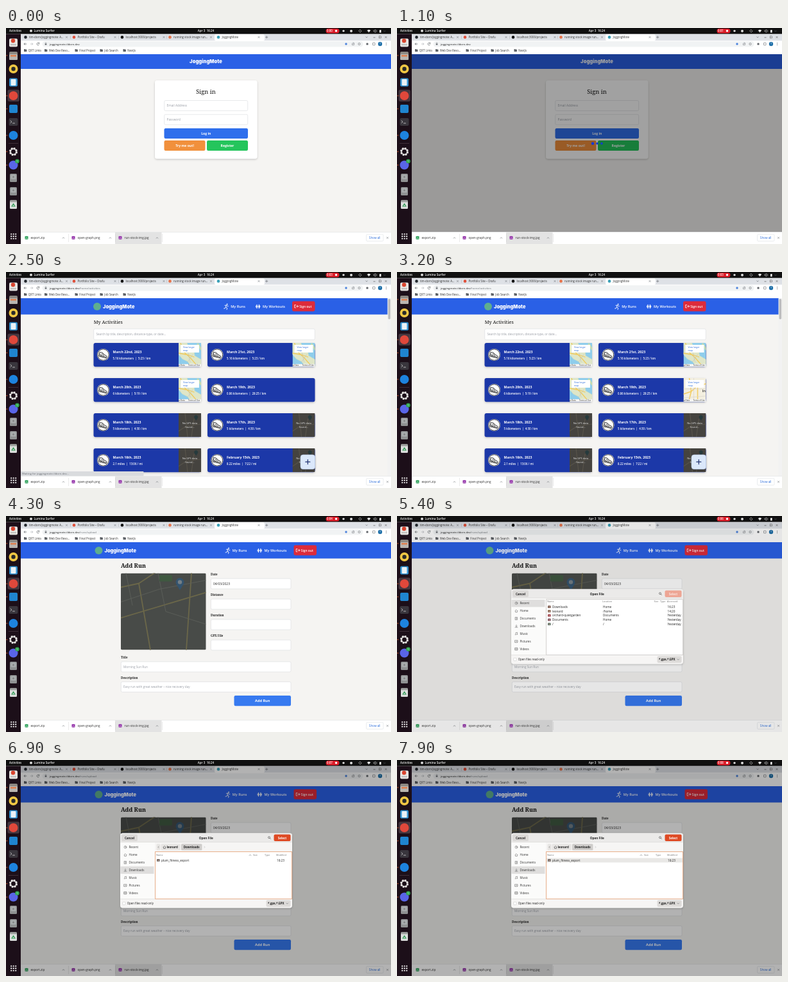
An HTML page for the animation above (8 s loop, 600 by 338 pixels).

```html
<!DOCTYPE html>
<html lang="en">
<head>
<meta charset="utf-8">
<title>Run log demo</title>
<style>
html, body { margin: 0; width: 100%; height: 100%; overflow: hidden; background: #fff; }
svg { display: block; }
#stage { width: 100vw; height: 100vh; }
text { font-family: "Open Sans", "Noto Sans", sans-serif; white-space: pre; }
.serif { font-family: "Noto Serif", serif; }
.brand { font-family: Inter, sans-serif; font-weight: 900; }
</style>
</head>
<body>
<svg id="stage" viewBox="0 0 600 338"></svg>
<script>
const LOOP = 8000;
const BRAND = 'JoggingMote', HOST = 'joggingmote.tldorn.dev';
const BLUE = '#2a60e6', GREY = '#5f6368';

const rect = (x, y, w, h, fill, r = 0, more = '') =>
  `<rect x="${x}" y="${y}" width="${w}" height="${h}" rx="${r}" fill="${fill}" ${more}/>`;
const disc = (x, y, r, fill, more = '') => `<circle cx="${x}" cy="${y}" r="${r}" fill="${fill}" ${more}/>`;
const line = (d, stroke, w = .7, fill = 'none') =>
  `<path d="${d}" stroke="${stroke}" stroke-width="${w}" fill="${fill}" stroke-linecap="round" stroke-linejoin="round"/>`;
const text = (x, y, size, str, fill = '#222', more = '') =>
  `<text x="${x}" y="${y}" font-size="${size}" fill="${fill}" ${more}>${str}</text>`;
const MID = 'text-anchor="middle" ', BOLD = 'font-weight="700" ', SEMI = 'font-weight="600" ';
const shift = (x, y, body) => `<g transform="translate(${x} ${y})">${body}</g>`;
const during = (from, to, body) => `<g data-from="${from}" data-to="${to}">${body}</g>`;
const cross = (x, y, c = GREY) => line(`M${x - 1.2} ${y - 1.2}l2.4 2.4m0-2.4l-2.4 2.4`, c, .5);
const caret = (x, y, up = 1) => line(`M${x - 1.3} ${y + .6 * up}l1.3 ${-1.3 * up} 1.3 ${1.3 * up}`, GREY, .6);
const field = (x, y, w, h) => rect(x, y, w, h, '#fff', 2, 'stroke="#d9dade" stroke-width=".6"');
const button = (x, y, w, h, fill, label, size = 5.1) =>
  rect(x, y, w, h, fill, 2.2) + text(x + w / 2, y + h / 2 + 1.9, size, label, '#fff', MID + BOLD);

function topBar() {
  return rect(0, 0, 600, 9.3, '#101010') + text(5, 6.3, 4.4, 'Activities', '#eee', SEMI) +
    disc(39, 4.6, 2, '#ddd') + text(43.5, 6.3, 4.7, 'Lumina Surfer', '#eee', SEMI) +
    text(311.5, 6.3, 4.5, 'Apr 3  16:24', '#eee', MID + SEMI) +
    rect(498.5, 1, 21, 7.3, '#dc1c28', 3.6) + text(500, 6.2, 4.4, '0:00', '#fff', 'id="timer" ' + SEMI) +
    rect(512.8, 2.8, 3.4, 3.4, '#fff', 1.7) + disc(526, 4.6, 1.7, '#ddd') + disc(538, 4.7, 2, '#ddd') +
    line('M552 2.8l2 2-2 2-2-2z', '#ddd') + line('M563 3.8q2.5-2 5 0l-2.5 3z', '#eee', .3, '#eee') +
    line('M573 3.8v1.8h1l1.6 1.4V2.4L574 3.8zM577.3 3.2q1 1.5 0 3', '#eee', .5) +
    rect(582, 3, 2.6, 4.3, '#eee', .5) + caret(590, 4.8, -1);
}

function dock() {
  const app = (y, fill, round) => round ? disc(11.5, y, 7, fill) : rect(5, y - 6.5, 13, 13, fill, 2);
  const dot = y => disc(1.4, y, .8, '#e5602c');
  let s = rect(0, 9.3, 23, 329, '#1c0f19') + rect(2.5, 96.5, 18.5, 18.5, '#46373f', 3);
  s += app(23, '#e6e4e1') + disc(11, 20, 3.2, '#d9452f') + rect(7, 25.5, 9, 1.2, '#aaa');
  s += rect(5, 37, 13, 13, '#8d8983', 2) + rect(5, 41, 13, 9, '#b9b5b0', 1.5) + rect(7, 42.5, 9, 2, '#e8743b');
  s += app(64, '#f0c744', 1) + disc(11.5, 64, 3.2, '#2a2a2a') + app(85, '#2f8fcd');
  s += rect(7.5, 80, 8, 10, '#eaf2f7', 1) + app(106, '#e0483b', 1) + app(126.5, '#1f84cf');
  s += rect(4.5, 141, 14, 12, '#39363d', 2) + line('M7 145l2 1.8-2 1.8M10.5 149h3', '#eee');
  s += app(168, '#1d83df', 1) + rect(4, 180, 15, .6, '#57464f');
  s += disc(11.5, 193.5, 5.3, 'none', 'stroke="#ecebe9" stroke-width="2.4" stroke-dasharray="2.8 1.3"') +
    disc(11.5, 193.5, 4.3, 'none', 'stroke="#ecebe9" stroke-width="1.6"');
  s += app(214.5, '#5965e8', 1) + disc(17.5, 208.5, 3.3, '#32a852') + text(17.5, 210, 4, '1', '#fff', MID);
  for (const y of [234.5, 255.5]) s += rect(6, y - 6.5, 11, 13, '#8f9192', 1.5) + rect(7.5, y - 5, 8, 7, '#aaaeaf', 1) + disc(11.5, y - 1.5, 1.6, '#858788');
  s += rect(6, 269.5, 11, 13.5, '#dcdedd', 1.5) + rect(6, 269.5, 11, 3, '#9da09e', 1) + line('M9 279l2.5-4 2.5 4z', '#2f9b55', 1.2);
  for (let i = 0; i < 9; i++) s += rect(7.2 + i % 3 * 3.5, 321.5 + (i / 3 | 0) * 3.5, 2, 2, '#f2f2f2', .5);
  return s + [43, 106, 126.5, 168, 193.5, 214.5].map(dot).join('');
}

function browser() {
  const tabs = [
    [30.5, 'tim-dorn/joggingmote: A…', 94.5, '#24292f'], [106, 'Portfolio Site – Drafu', 170, '#e0503a'],
    [181, 'localhost:3000/projects', 246, '#111'], [255.5, 'running stock image run…', 319.5, '#e8734a'],
    [331, BRAND, 394, '#3aa0b8']];
  let s = rect(23, 9.3, 577, 329, '#fff') + rect(23, 9.3, 577, 10.4, '#dee1e6') + rect(325, 10, 78, 10, '#fff', 2.5);
  for (const [x, name, end, color] of tabs)
    s += disc(x, 14.4, 2.3, color) + text(x + 5.4, 16, 4.4, name, '#333') + cross(end, 14.4);
  for (const x of [100, 175, 250]) s += rect(x, 12, .4, 5, '#a5a8ad');
  s += line('M404.5 14.4h3.4m-1.7-1.7v3.4', GREY, .6) + caret(562, 14.4, -1) + rect(572.5, 14.6, 3, .6, '#444');
  s += rect(581.5, 12.8, 3, 3, 'none', 0, 'stroke="#444" stroke-width=".5"') + cross(592, 14.4, '#444');
  s += line('M31.8 25h-3.6m1.5-1.6l-1.6 1.6 1.6 1.6', GREY) + line('M38.2 25h3.6m-1.5-1.6l1.6 1.6-1.6 1.6', '#b5b8bc');
  s += line('M51.6 24a1.9 1.9 0 1 0 0 2m.2-3v1.2h-1.2', GREY) + rect(56.5, 20.8, 500, 8.6, '#f1f3f4', 4.3);
  s += rect(60.7, 24.4, 2.6, 2.2, GREY, .3) + line('M61.2 24.4v-1a.8.8 0 0 1 1.6 0v1', GREY, .4);
  const url = (from, to, path) => during(from, to, text(68, 26.6, 4.3, `${HOST}<tspan fill="#70757a">${path}</tspan>`));
  s += url(0, 1500, '') + url(1500, 3800, '/home/activities') + url(3800, LOOP, '/runs/upload');
  s += disc(530, 25, 1.7, '#4b82dc') + line('M539.4 26.2v-2h3v2zM541 22.8l1.7 1', GREY, .5) + disc(550.5, 25, 1.6, 'none', `stroke="${GREY}" stroke-width=".6"`);
  s += rect(561.5, 23.5, 3, 3, GREY, .6) + rect(571.5, 23.2, 3.6, 3.6, 'none', .4, `stroke="${GREY}" stroke-width=".6"`);
  s += disc(583, 25, 3.2, '#1d6fa8') + text(583, 26.4, 3.8, 'T', '#fff', MID);
  for (const y of [23.3, 25, 26.7]) s += disc(592.5, y, .5, GREY);
  for (const [x, name] of [[28, 'QRT Links'], [60, 'Web Dev Reso…'], [107.5, 'Final Project'], [146.5, 'Job Search'], [182.5, 'NextJs']])
    s += rect(x, 33.5, 4.4, 3.4, GREY, .5) + rect(x, 33, 2, 1.2, GREY, .4) + text(x + 6.8, 37, 4.4, name, '#333');
  return s;
}

function downloads() {
  let s = rect(23, 319, 577, 19, '#fff') + rect(23, 319, 577, .5, '#d4d6d9') + rect(170, 319.5, 72.5, 18.5, '#e3e3e3');
  for (const [x, name, end, color] of [[29.5, 'export.zip', 89.5, '#2da15a'], [102.5, 'open-graph.png', 162.5, '#922fa8'], [175.5, 'run-stock-img.jpg', 235.5, '#922fa8']])
    s += rect(x, 325.8, 5, 5, color, .8) + line(`M${x + 1} 329.8l1.5-2 1.5 2`, '#fff', .5) +
      text(x + 9, 330, 4.7, name, '#333') + caret(end, 328.4) + rect(end + 7.5, 322, .4, 13, '#ccc');
  return s + rect(561.5, 323, 26.5, 10.5, '#fff', 1.5, 'stroke="#d5d8dc" stroke-width=".5"') +
    text(574.7, 330, 4.6, 'Show all', '#2b6cdb', MID) + cross(594.5, 328.3);
}

function login() {
  return rect(23, 41, 577, 278, '#f5f4f2') + rect(23, 41, 577, 23, BLUE) +
    text(311.5, 55.4, 7.6, BRAND, '#fff', MID + 'class="brand"') +
    rect(232, 82, 159.5, 122.5, '#fff', 3.5, 'filter="url(#soft)"') +
    text(311.5, 103.3, 9.3, 'Sign in', '#111', MID + 'class="serif" font-weight="500"') +
    field(246.7, 113.5, 130, 16) + text(250.5, 123.2, 4.8, 'Email Address', '#9a9ea6') +
    field(246.7, 135.3, 130, 16) + text(250.5, 145, 4.8, 'Password', '#9a9ea6') +
    button(246.5, 157, 130.5, 16, '#2f6fec', 'Log in') +
    button(246.5, 176, 64, 16, '#f1903c', 'Try me out!') + button(313, 176, 64, 16, '#24c55c', 'Register');
}

const nav = dx => rect(23, 41, 577, 25.5, BLUE) + shift(dx, 0,
  disc(142, 54, 6, '#5fae8e') + text(151, 56.6, 7.4, BRAND, '#fff', 'class="brand"') +
  disc(344.6, 50.6, 1, '#fff') + line('M341 52.3l2.4-.3-1 3 2.2 1.2-.5 2.6M342.2 55.4l-1 1.6h-1.6M343.8 52l1 1.4h1.5', '#fff', .9) +
  text(350.3, 55.9, 5.5, 'My Runs', '#fff', SEMI) +
  line('M389.7 53v2M395.7 53v2', '#fff', 1) + line('M391 51.5v5M394.4 51.5v5', '#fff', 1.3) + line('M391 54h4', '#fff', 1) +
  text(400, 55.9, 5.5, 'My Workouts', '#fff', SEMI) + rect(446, 45.8, 35.5, 15.7, '#dc2b3b', 2.4) +
  line('M451.5 51.5h-1.8v4.4h1.8M452 53.7h3.4m-1.4-1.5l1.5 1.5-1.5 1.5', '#fff', .8) + text(457.2, 55.5, 4.9, 'Sign out', '#fff', SEMI));

const thumb = (x, y, body) => `<svg x="${x}" y="${y}" width="35" height="37">${body}</svg>`;

function cityMap(x, y, inland) {
  const scene = inland
    ? rect(0, 0, 35, 37, '#f3efe0') + line('M0 25l12-4 10-9 13-3M8 37l4-16-3-21M22 37V12', '#f3cd62', 1.5) + line('M0 17h35M16 0v37M0 31l35-3', '#d8d5cb', .7) + text(29, 22, 6, 'In', '#333', SEMI)
    : rect(0, 0, 35, 37, '#8fcdeb') + line('M0 0h13l3 8 8 6 1 6 10 6v11H20l-6-8-8-4-6-7z', '#d5e3bd', .6, '#dfe6c8') +
      line('M3 0l5 14 10 9 12 14M0 16l16 3 8 3', '#f0cb5f', 1.3) + line('M14 12l4 18M22 18l-8 12', '#c7c4b8', .6) + line('M30 2l5 8', '#c4dcb0', 3);
  return thumb(x, y, scene + rect(3, 3, 29, 12, '#fff', .5) + text(7, 8, 3.5, 'View larger', '#2b6cdb') + text(7, 12.7, 3.5, 'map', '#2b6cdb') +
    rect(0, 33, 35, 4, '#f4f4f2') + text(-4, 36.2, 3, 'Map Data', '#333') + text(15, 36.2, 3, 'Terms of Use', '#333'));
}

const noGps = (x, y) => thumb(x, y, rect(0, 0, 35, 37, '#45433f') + line('M0 28l12-8 23-3M10 0l4 37M24 9l-4 28', '#57534a', 1.2) +
  line('M27.2 11l-2.6-4a2.8 2.8 0 1 1 5.2 0z', '#263a3d', .5, '#263a3d') +
  text(17.5, 17, 4, 'No GPS data', '#e8e8e8', MID) + text(17.5, 23, 4, 'found...', '#e8e8e8', MID));

const shoe = disc(0, 0, 9.6, '#fff') + disc(0, 0, 8.7, 'none', 'stroke="#111" stroke-width=".8"') +
  '<g transform="rotate(14)">' + line('M-6.2 1.5V-3q1.6 1.4 3.4-.2l4.6 2.8 3.4.8q1.5.6 1 2.2H-6z', '#111', .8) +
  line('M-6 4h12.2M-1.6-1.6l-1.4 1.6M0-.7l-1.4 1.6M1.6.2L.2 1.8M-6 .2l4 2', '#111', .7) + '</g>';

function activities() {
  const runs = [
    ['March 22nd, 2023', '5.16 kilometers  |  5:23 / km', 2300], ['March 21st, 2023', '5.16 kilometers  |  5:23 / km', 2400],
    ['March 20th, 2023', '6 kilometers  |  5:19 / km', 2500], ['March 19th, 2023', '0.86 kilometers  |  28:25 / km', 2700],
    ['March 18th, 2023', '5 kilometers  |  4:30 / km'], ['March 17th, 2023', '5 kilometers  |  4:30 / km'],
    ['March 16th, 2023', '2.1 miles  |  13:06 / mi'], ['February 15th, 2023', '8.22 miles  |  7:22 / mi']];
  let s = rect(23, 41, 577, 278, '#f5f4f2') + nav(0) + text(136.7, 81.2, 7.3, 'My Activities', '#111', 'class="serif" font-weight="500"') +
    field(136.7, 89, 344.6, 17) + text(140.5, 99.2, 4.6, 'Search by title, description, distance-type, or date...', '#9a9ea6');
  runs.forEach(([day, stats, loaded], i) => {
    const x = 136.5 + i % 2 * 177.5, y = 111 + (i >> 1) * 55;
    s += rect(x, y, 167.5, 37.3, '#1e38a8', 3, 'filter="url(#soft)"') + shift(x + 15, y + 18.5, shoe) +
      text(x + 30, y + 15.5, 5.2, day, '#fff', BOLD) + text(x + 30, y + 25.8, 4.4, stats, '#fff', SEMI) +
      (loaded ? during(loaded, LOOP, cityMap(x + 132.5, y, i === 3)) : noGps(x + 132.5, y));
  });
  return s + rect(459, 286, 22.7, 22.5, '#dbe8fb', 4, 'stroke="#b9cdee" stroke-width=".6" filter="url(#soft)"') +
    line('M466.8 297.2h7m-3.5-3.5v7', '#1e2f6e', 1.2) +
    rect(594.5, 41, 5.5, 278, '#f2f2f2') + rect(595.5, 42, 3.6, 32, '#bdbdbd', 1.8) +
    during(1500, 2900, rect(23, 312, 191.5, 7, '#d9dbde', 1) + text(25, 317, 4.3, `Waiting for ${HOST}...`, '#6b6f74'));
}

function upload() {
  const label = (x, y, str) => text(x, y, 4.5, str, '#222', 'class="serif" ' + SEMI);
  let s = rect(23, 41, 577, 278, '#f5f4f2') + nav(2.5) + text(179, 80.6, 9, 'Add Run', '#111', 'class="serif" ' + BOLD);
  s += '<svg x="179" y="89.5" width="132.5" height="120">' + rect(0, 0, 133, 120, '#484b48', 2) +
    line('M0 22l28-6 30-20M28 16l18 104M0 70l133-40M110 0l-8 120', '#6b6749', 1.8) +
    line('M8 0l10 50M58 0l12 60 63 20M0 45l60-20 73-14', '#5d605b', .9) + rect(60, 3, 20, 10, '#3f5840', 1) +
    disc(92, 14, 6.5, '#34546f') + disc(92, 14, 3.2, '#747f86') + line('M87 18l5 8 5-8z', '#34546f', .5, '#34546f') + '</svg>';
  ['Date', 'Distance', 'Duration', 'GPX File'].forEach((name, i) => {
    s += label(319, 93 + 32 * i, name) + field(319.3, 98 + 32 * i, 124.7, 16);
  });
  return s + text(323, 107.8, 4.9, '04/03/2023', '#222') +
    label(179, 222.5, 'Title') + field(179.3, 228, 264.7, 16) + text(183, 237.8, 4.7, 'Morning Sun Run', '#9a9ea6') +
    label(179, 254.6, 'Description') + field(179.3, 259.5, 264.7, 16) + text(183, 269.4, 4.7, 'Easy run with great weather – nice recovery day', '#9a9ea6') +
    button(355.5, 281, 88.5, 16.2, '#377af0', 'Add Run', 5.6);
}

function dialog() {
  const OPEN = 6900;
  const places = [
    ['Recent', 'M2-.2a2 2 0 1 1-4 0a2 2 0 1 1 4 0M0-1.4V0h1'], ['Home', 'M-2 0l2-2 2 2M-1.4 0v2h2.8V0'],
    ['Documents', 'M-1.5-2h3v4h-3zM-.6-.6h1.2M-.6.6h1.2'], ['Downloads', 'M0-2v3M-1.3-.2L0 1.1 1.3-.2M-2 2h4'],
    ['Music', 'M-1 1.4v-3l2.5-.4v3M-1.8 1.6h.8M.7 1.2h.8'], ['Pictures', 'M-2-1.6h4v3.4h-4zM-1.5 1.3L0-.3l1.6 1.5'],
    ['Videos', 'M-2-1.6h4v3.4h-4zM-1-1.6v3.4M1-1.6v3.4']];
  const rowY = i => 136.6 + i * 11.9;
  const folder = (y, c) => rect(235, y - 2, 4.6, 3.8, c, .6) + rect(236.3, y - .6, 2, 1.4, '#c9a99a', .3);
  const head = (y, cols) => cols.map(([x, s]) => text(x, y, 3.8, s, '#777')).join('');
  const picked = i => rect(178.5, rowY(i) - 5.8, 52, 11.6, '#dfdedd');
  const border = (y, c) => rect(232.6, y, 212.9, 217.3 - y, '#fff', 0, `stroke="${c}" stroke-width=".9"`);
  const select = (fill, ink) => rect(417.5, 116.6, 26, 10.5, fill, 2) + text(430.5, 123.5, 4.5, 'Select', ink, MID + BOLD);

  let s = rect(178, 114.5, 268, 117, '#f6f5f4', 4, 'filter="url(#soft)"') + rect(178, 114.5, 268, 14.5, '#ebeae9', 4) +
    rect(178, 128.6, 268, .5, '#d2d0ce') + rect(178, 129, 54, 88.5, '#fbfbfa') + rect(178, 217.5, 268, .5, '#d2d0ce') +
    rect(180, 116.6, 25, 10.5, '#dbd9d7', 2) + text(192.5, 123.5, 4.6, 'Cancel', '#222', MID + BOLD) +
    text(311.8, 123.6, 4.7, 'Open File', '#222', MID + BOLD) +
    disc(410, 121.2, 1.5, 'none', 'stroke="#444" stroke-width=".6"') + line('M411.2 122.4l1.3 1.3', '#444', .6) +
    during(0, OPEN, select('#eda594', '#fbe6e0') + picked(0)) + during(OPEN, LOOP, select('#de4a24', '#fff') + picked(3));
  places.forEach(([name, icon], i) => s += shift(186, rowY(i), line(icon, '#666', .55)) + text(191.5, rowY(i) + 1.7, 4.6, name, '#333'));

  const files = [['Downloads', 'Home', '16:23', '#7b5a4e'], ['leonard', '/home', '14:20', '#8a6a55'],
    ['orchard-quietgarden', 'Documents', 'Yesterday', '#a2404a'], ['Documents', 'Home', 'Yesterday', '#7b4e5c'], ['/', '/', 'Yesterday', '#5f7568']];
  let recent = border(130.6, '#cfcdcb') + during(6000, LOOP, border(130.6, '#e6a57d')) +
    head(135.2, [[234, 'Name'], [320, 'Location'], [400.5, 'Size'], [410, 'Type'], [421, 'Accessed']]);
  files.forEach(([name, place, time, color], i) => {
    const y = 142.3 + i * 6.75;
    recent += folder(y, color) + text(242, y + 1.6, 4.6, name) + text(321, y + 1.6, 4.6, place) + text(421.5, y + 1.6, 4.7, time);
  });
  const inside = rect(232, 129, 214, 14, '#f6f5f4') + border(143.6, '#e6a57d') +
    rect(234.5, 131.3, 6, 10, '#e8e6e4', 1.5) + line('M238.2 135l-1.2 1.3 1.2 1.3', '#555', .5) +
    rect(241.5, 131.3, 30.5, 10, '#e8e6e4', 1.5) + shift(247, 136.4, line(places[1][1], '#444', .6)) + text(250.5, 138, 4.5, 'leonard', '#222', BOLD) +
    rect(273, 131.3, 32.5, 10, '#cfcdcb', 1.5) + text(289.2, 138, 4.5, 'Downloads', '#222', MID + BOLD) + line('M308.8 135l1.2 1.3-1.2 1.3', '#aaa', .5) +
    head(150, [[234, 'Name'], [385, 'Size'], [403, 'Type'], [421, 'Modified']]) + caret(380.5, 148.8) +
    during(7900, LOOP, rect(233, 153.4, 212, 7, '#e9e8e6')) +
    folder(157, '#6c6460') + text(242, 158.6, 4.6, 'plum_fitness_export') + text(422, 158.6, 4.7, '16:23');
  return s + during(0, OPEN, recent) + during(OPEN, LOOP, inside) +
    rect(181.7, 222.2, 4.4, 4.4, '#fff', .8, 'stroke="#c4c2c0" stroke-width=".5"') + text(188.7, 226.1, 4.4, 'Open files read-only') +
    rect(405.5, 219.3, 38, 10.4, '#dddbd9', 2) + text(408, 226.1, 4.5, '*.gpx,*.GPX', '#222', BOLD) + caret(438.3, 224.5, -1);
}

const loading = rect(23, 41, 577, 278, '#000', 0, 'opacity=".37"') +
  [305, 312, 319].map(x => disc(x, 180.7, 2.3, '#1238d8', 'class="dot"')).join('');

const stage = document.getElementById('stage');
stage.innerHTML = `<defs><filter id="soft" x="-10%" y="-10%" width="120%" height="130%">
  <feDropShadow dx="0" dy="1.2" stdDeviation="1.6" flood-opacity=".22"/></filter></defs>` +
  browser() + during(0, 1500, login()) + during(1100, 1500, loading) +
  during(1500, 3800, activities()) + during(3800, LOOP, upload()) + downloads() +
  rect(23, 9.3, 577, 329, '#000', 0, 'id="dim"') + topBar() + dock() + during(5200, LOOP, dialog());

const timed = [...stage.querySelectorAll('[data-from]')];
const dots = [...stage.querySelectorAll('.dot')];
const timer = document.getElementById('timer'), dim = document.getElementById('dim');
const start = performance.now();

function draw() {
  const t = (performance.now() - start) % LOOP;
  for (const el of timed) el.style.display = t >= +el.dataset.from && t < +el.dataset.to ? '' : 'none';
  timer.textContent = `0:0${Math.floor((t + 600) / 1000)}`;
  dim.setAttribute('opacity', .3 * Math.min(1, Math.max(0, (t - 5240) / 500)));
  dots.forEach((dot, i) => dot.setAttribute('r', 2.2 + .5 * Math.sin((t - 1100) / 120 - i)));
  requestAnimationFrame(draw);
}
draw();
</script>
</body>
</html>
```
